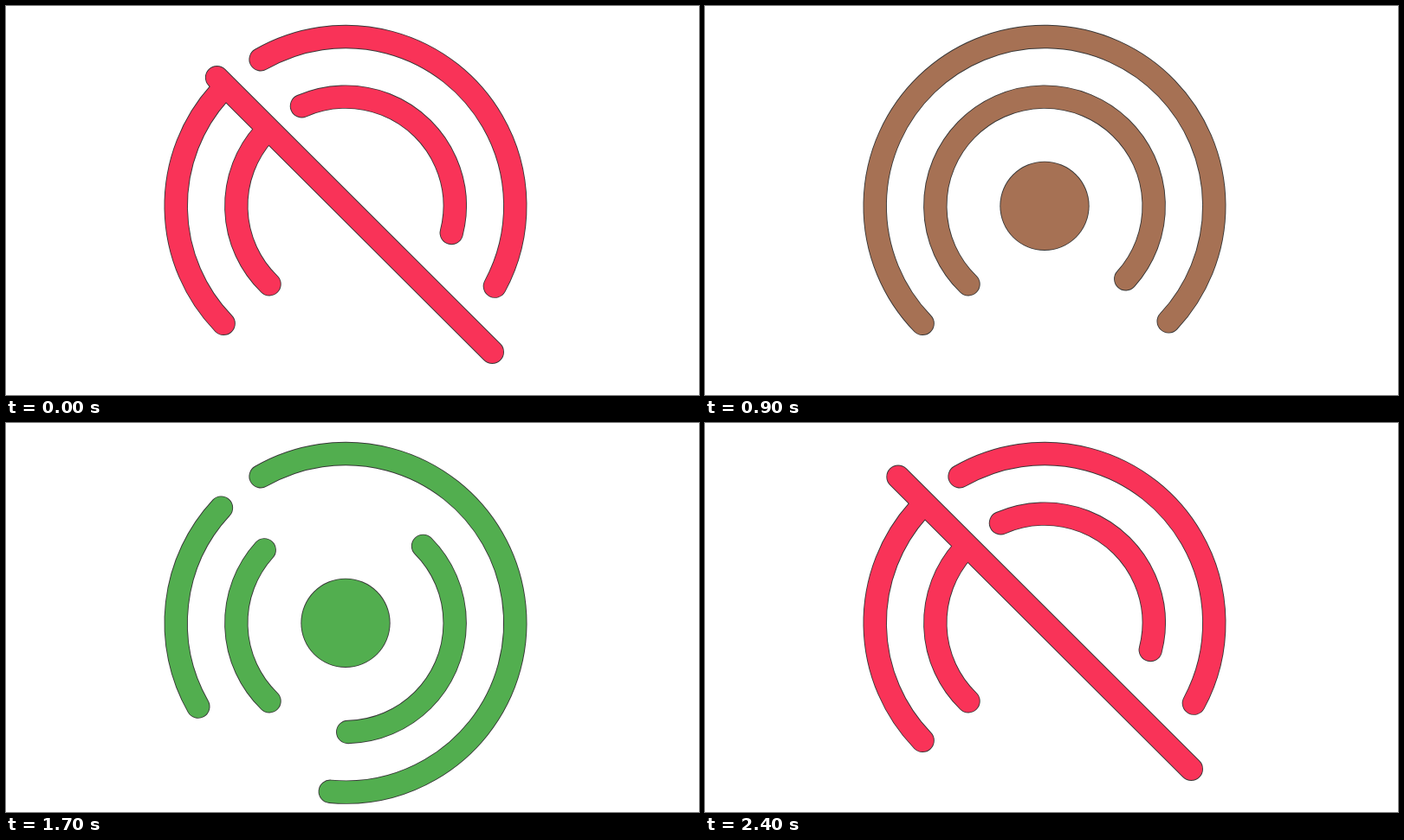
Recreate the animation shown at these times as an HTML page with a canvas. Size 800 by 450 pixels, loop 3000 ms.

```html
<!DOCTYPE html>
<html lang="en">
<head>
<meta charset="utf-8">
<title>Signal on and off</title>
<style>
  html, body { margin: 0; width: 100%; height: 100%; overflow: hidden; background: #fff; }
  canvas { display: block; }
</style>
</head>
<body>
<canvas id="stage" width="800" height="450"></canvas>
<script>
const ctx = document.getElementById('stage').getContext('2d');
const CX = 392, CY = 231.3, WIDTH = 25.6, EDGE = 0.9;
const RED = [249, 51, 88], GREEN = [82, 174, 79], DARK = [54, 84, 58], RIM = '#383838';
const LOOP = 3000, STEP = 100, LAST = 24;

const mix = (a, b, p) => a + (b - a) * p;
const blend = (a, b, p) => a.map((v, i) => mix(v, b[i], p));
const css = c => `rgb(${c.map(Math.round)})`;

// Eased 0..1 between two times, measured in steps
function ease(t, from, to) {
  const u = Math.min(1, Math.max(0, (t - from) / (to - from)));
  return u * u * (3 - 2 * u);
}

function stroke(path, color, grow) {
  ctx.strokeStyle = color;
  ctx.lineWidth = WIDTH + 2 * grow;
  ctx.lineCap = 'round';
  ctx.beginPath();
  path();
  ctx.stroke();
}

const arc = (r, from, to) => () =>
  ctx.arc(CX, CY, r, from * Math.PI / 180, to * Math.PI / 180);

function disc(r, color) {
  ctx.fillStyle = color;
  ctx.beginPath();
  ctx.arc(CX, CY, r, 0, 2 * Math.PI);
  ctx.fill();
}

// The left arc closes up into a full ring while the right one slides round and vanishes
function ring(t, o) {
  const opening = ease(t, 0.28, 8.2);
  const on = t < 10;
  const leftEnd = on ? opening : 1 - ease(t, 11, o.leftDone);
  const rightStart = on ? opening : 1 - ease(t, ...o.rightTime);
  const rightEnd = on ? opening
    : 1 - Math.min(1, Math.max(0, (t - 14) / 6)) ** 1.4;
  const swing = t > 12 && t < 18 ? o.swing * Math.sin(Math.PI * (t - 12) / 6) ** 2 : 0;

  const paths = [arc(o.r, o.start + swing, mix(222, o.full, leftEnd))];
  const a = mix(o.right[0], o.start + 360, rightStart);
  const b = mix(o.right[1], o.start + 360, rightEnd);
  if (b - a > 0.5) paths.push(arc(o.r, a, b));
  return paths;
}

const OUTER = { r: 195.8, start: 136, full: 403, right: [240, 388.3],
  leftDone: 17.25, rightTime: [12, 17], swing: 57.5 };
const INNER = { r: 126.2, start: 134.2, full: 402, right: [246.4, 374.3],
  leftDone: 15.5, rightTime: [13.8, 18.7], swing: 0 };

function slash(t) {
  const from = t < 10 ? ease(t, -0.6, 3.4) : 0;
  const to = t < 10 ? 1 : ease(t, 18, 22);
  if (to - from < 0.001) return [];
  const x = p => mix(223, 561.3, p), y = p => mix(62.2, 400.2, p);
  return [() => { ctx.moveTo(x(from), y(from)); ctx.lineTo(x(to), y(to)); }];
}

function draw(t) {
  ctx.fillStyle = '#fff';
  ctx.fillRect(0, 0, 800, 450);

  const color = blend(RED, GREEN, ease(t, 7.5, 10.5) - ease(t, 20.5, 23.5));
  const paths = [...ring(t, OUTER), ...ring(t, INNER), ...slash(t)];
  const pulse = 51.2 + 1.25 * Math.cos(Math.PI * (t - 15) / 4);
  const radius = pulse * (ease(t, 1.5, 4.7) - ease(t, 17.8, 22.2));

  // Thin dark rim below everything, then the fills
  paths.forEach(p => stroke(p, RIM, EDGE));
  if (radius > 1) {
    disc(radius + EDGE / 2, RIM);
    disc(radius - EDGE / 2, css(blend(color, DARK, ease(t, 18, 20))));
  }
  paths.forEach(p => stroke(p, css(color), 0));
}

const begin = performance.now();
function tick() {
  const ms = (performance.now() - begin) % LOOP;
  draw(Math.min(LAST, Math.floor(ms / STEP)));
  requestAnimationFrame(tick);
}
tick();
</script>
</body>
</html>
```
